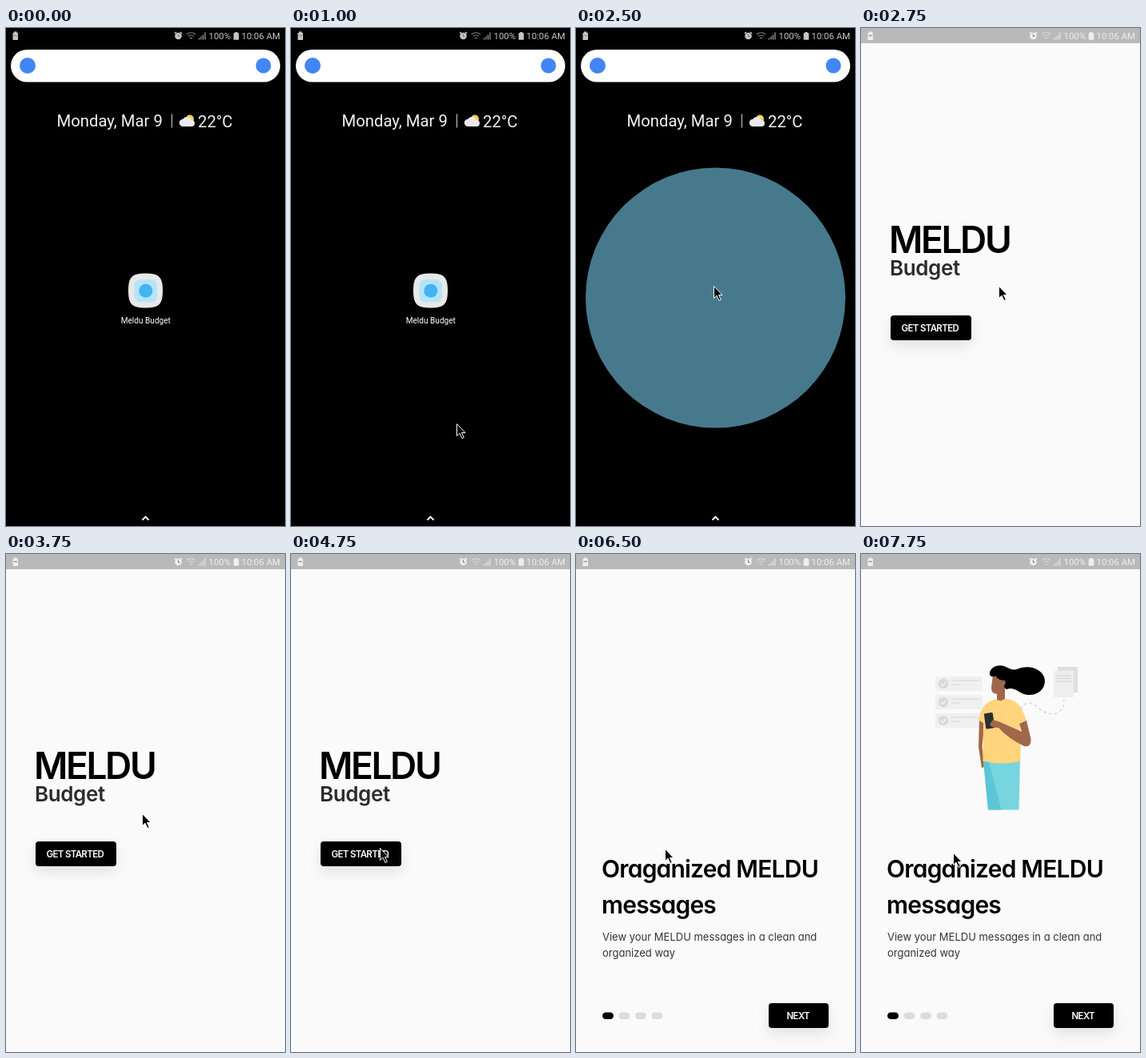
Animation, 349 px wide and 622 px high, one loop 8 s. Source, as an HTML page:

```html
<!DOCTYPE html>
<html lang="en">
<head>
<meta charset="utf-8">
<title>Budget app intro</title>
<style>
  html, body { margin: 0; width: 100%; height: 100%; overflow: hidden; background: #000; }
  svg { display: block; width: 349px; height: 622px; }
  text { white-space: pre; }
  .ui { font-family: Roboto, "Noto Sans", sans-serif; }
  .app { font-family: Inter, Lato, sans-serif; font-feature-settings: "cv11"; }
  .label { font-size: 11.5px; font-weight: 600; letter-spacing: -.65px; fill: #fff; }
  .button { filter: drop-shadow(0 7px 8px rgba(60, 60, 90, .13)); }
  #splash, #intro, #art, #bubble, #ripple, #cursor, #light { opacity: 0; }
</style>
</head>
<body>
<svg viewBox="0 0 349 622">
  <defs>
    <clipPath id="startClip"><rect x="37" y="359" width="101" height="31" rx="4"/></clipPath>
    <g id="card">
      <rect width="59" height="18" fill="#f0f0f0"/>
      <circle cx="10" cy="9" r="6.2" fill="#d9d9d9"/>
      <path d="M7 9l2.3 2.4 4-4.4" fill="none" stroke="#f4f4f4" stroke-width="1.4"/>
      <path d="M20 5h35M20 10h12" stroke="#dedede" stroke-width="1.7"/>
    </g>
  </defs>

  <g id="home">
    <rect width="349" height="622"/>
    <rect x="6" y="27" width="337" height="40.5" rx="20.2" fill="#fff"/>
    <circle cx="27" cy="47" r="10" fill="#4285f4"/>
    <circle cx="322" cy="47" r="9.5" fill="#4285f4"/>
    <g class="ui" fill="#f2f2f2" font-size="20.3">
      <text x="63.5" y="123">Monday, Mar 9</text>
      <text x="240" y="124">22°C</text>
    </g>
    <path d="M207.5 107.5v17" stroke="#cfcfcf"/>
    <circle cx="230" cy="113.5" r="5" fill="#fdd04a"/>
    <path d="M221.5 123a4.6 4.6 0 0 1-.3-9.2a6 6 0 0 1 10.8 1.2a4 4 0 0 1 0 8z" fill="#e9e9ee"/>
    <path d="M174.5 306.5c17 0 21.5 4.5 21.5 21.5s-4.5 21.5-21.5 21.5s-21.5-4.500-21.5-21.5s4.5-21.5 21.5-21.5z" fill="#e8e8e8"/>
    <rect x="160.5" y="314" width="28.5" height="28.5" rx="8" fill="#b4e4fa"/>
    <circle cx="174.8" cy="328.2" r="8.5" fill="#42b4ee"/>
    <text class="ui" x="174.8" y="369" text-anchor="middle" font-size="10.1" fill="#fff">Meldu Budget</text>
    <path d="M170.5 614.5l4-4 4 4" fill="none" stroke="#fff" stroke-width="1.8"/>
    <circle id="bubble" cx="174.5" cy="337" r="162.5" fill="#47798d"/>
  </g>

  <g id="light">
    <rect width="349" height="622" fill="#fafafa"/>
    <rect width="349" height="19" fill="#b9b9b9"/>
  </g>

  <g id="splash" class="app">
    <text x="35" y="280.5" font-size="46" font-weight="600" letter-spacing="-2.4">MELDU</text>
    <text x="36" y="309" font-size="26" font-weight="600" letter-spacing="-.4" fill="#2b2b2b">Budget</text>
    <rect class="button" x="37" y="359" width="101" height="31" rx="4"/>
    <g clip-path="url(#startClip)">
      <circle id="ripple" cx="112" cy="368" r="61" fill="#fff"/>
    </g>
    <text class="label" x="50.5" y="378.5">GET STARTED</text>
  </g>

  <g id="intro" class="app">
    <g id="art">
      <use href="#card" x="93" y="153"/>
      <use href="#card" x="93" y="176"/>
      <use href="#card" x="93" y="199"/>
      <rect x="246" y="141" width="25" height="32" fill="#dfdfdf"/>
      <rect x="241" y="146" width="25" height="33" fill="#eee"/>
      <path d="M244 152h19M244 155.5h19M244 159h19" stroke="#dadada" stroke-width="1.5"/>
      <path d="M200 194C203 185 212 184 218 189S236 204 246 198S253 188 254 182" fill="none" stroke="#d9d9d9" stroke-width="1.5" stroke-dasharray="4 3"/>
      <path d="M148 207L155 209 151.5 240 154.5 266 151 267 147 241z" fill="#a0674a"/>
      <path d="M153 258Q175 264 199 258L197.5 319.5H159z" fill="#76d5de"/>
      <path d="M153 258L160 260 175.5 319.5H159z" fill="#5cc6d6"/>
      <path d="M170 181Q175 184 180 180.5C193 182 200 188 205 203L207 208 198 212 199.5 226V259Q175 264.5 152.5 258.5L153 211 147 207.5C149 195 155 184 170 181z" fill="#ffd47c"/>
      <path d="M165 151L163 167Q163 175 170 174.5V181.5Q174 185 180 181V166L184 160 178 150z" fill="#a0674a"/>
      <path d="M161 151C160 142 170 137 179 140C186 143 189 146 196 143.5C213 137 230 146 230 158.5C230 171 218 178 206 175.5C196 173 192 165 182 169Q179 168 179 164Q182 162 180 158Q172 158 168 152Q164 155 161 151z"/>
      <path d="M198 212L207 208 212.5 231Q213 242 204 240Q185 231 172 217L163 215 164 207 173 209.5 201 222z" fill="#a0674a"/>
      <rect x="155" y="198.5" width="11" height="19.5" rx="1.5" fill="#2c2d32" transform="rotate(-8 160.5 208)"/>
      <path d="M161 213l4-6 7 3-1 7-7-1z" fill="#a0674a"/>
    </g>
    <g font-size="30" font-weight="600" letter-spacing="-.8">
      <text x="32" y="404">Oraganized MELDU</text>
      <text x="32" y="449">messages</text>
    </g>
    <g font-size="13" fill="#333">
      <text x="33" y="483">View your MELDU messages in a clean and</text>
      <text x="33" y="503">organized way</text>
    </g>
    <rect x="33" y="572.5" width="14" height="8.5" rx="4.25"/>
    <g fill="#dcdcdc">
      <rect x="53.5" y="572.5" width="14" height="8.5" rx="4.25"/>
      <rect x="74" y="572.5" width="14" height="8.5" rx="4.25"/>
      <rect x="94.5" y="572.5" width="14" height="8.5" rx="4.25"/>
    </g>
    <rect class="button" x="241" y="561" width="75" height="31" rx="4"/>
    <text class="label" x="263.5" y="581">NEXT</text>
  </g>

  <g id="status" class="ui" color="#c4c4c4" fill="currentColor" font-size="11.4">
    <path d="M10 4.5h3.5v1.5h1.5v9h-6.5v-9h1.5z"/>
    <path d="M9.5 9.5h4.5" stroke="#999" stroke-width="1.5"/>
    <circle cx="215.5" cy="10" r="4.3"/>
    <path d="M211 7l2-2M220 7l-2-2" stroke="currentColor" stroke-width="1.5"/>
    <path d="M215.5 7.5v3h2" fill="none" stroke="#777"/>
    <g fill="none" stroke="currentColor">
      <path d="M226 8q5.5-4.5 11 0M228 10.5q3.5-3 7 0M230 13q1.5-1.3 3 0" stroke-width="1.1" opacity=".65"/>
      <path d="M241.5 14.5v-2M244 14.5v-4M246.5 14.5v-6M249 14.5v-9" stroke-width="1.2" opacity=".85"/>
    </g>
    <text x="253.5" y="14.2">100%</text>
    <path d="M286.5 5h3v1.2h1.8v8.6h-6.6v-8.6h1.8z"/>
    <text x="294.5" y="14.2">10:06 AM</text>
  </g>

  <g id="cursor">
    <path d="M.5.5V15.5L4 12.2 7 18.5 9.3 17.4 6.5 11.5H11z" stroke="#fff" stroke-width="1"/>
  </g>
</svg>
<script>
  const LOOP = 8000;

  // Hold each value until the next row's time.
  function hold(id, prop, rows) {
    const end = [LOOP, rows[rows.length - 1][1]];
    const frames = [...rows, end].map(([ms, value]) => ({
      offset: ms / LOOP, [prop]: value, easing: 'step-end'
    }));
    document.getElementById(id).animate(frames, { duration: LOOP, iterations: Infinity });
  }

  const show = (id, from, to = LOOP, level = 1) =>
    hold(id, 'opacity', [[0, 0], [from, level], ...(to < LOOP ? [[to, 0]] : [])]);

  show('bubble', 2500, 2750);
  show('light', 2750);
  show('splash', 2750, 6500);
  show('ripple', 5750, 6500, 0.13);
  show('intro', 6500);
  show('art', 7250);
  show('cursor', 750);
  hold('status', 'color', [[0, '#c4c4c4'], [2750, '#efefef']]);

  const path = [
    [0, 222, 569], [1000, 207, 494], [1250, 185, 398], [1500, 180, 354],
    [1750, 173, 324], [2000, 172, 322], [3750, 170, 324], [4000, 145, 345],
    [4250, 112, 373], [4500, 111, 367], [6500, 111, 368], [7750, 115, 373]
  ];
  hold('cursor', 'transform', path.map(([ms, x, y]) => [ms, `translate(${x}px, ${y}px)`]));
</script>
</body>
</html>
```
